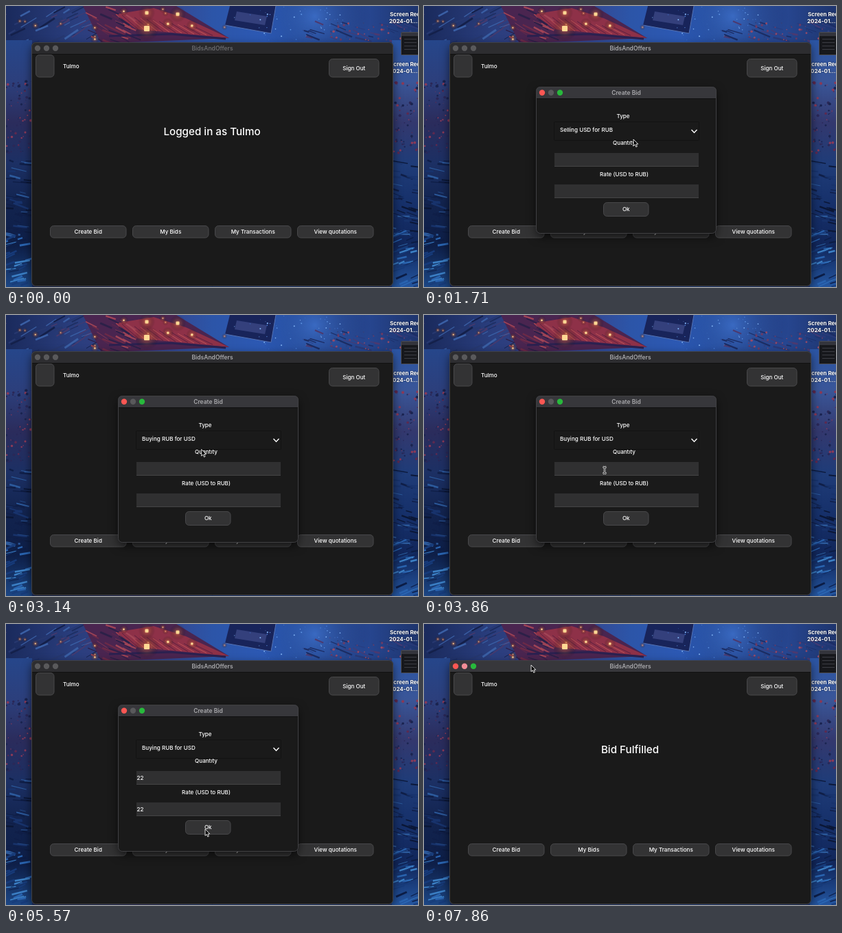
An HTML page with a canvas that plays this animation: 600x411 px, repeating every 8000 ms.

```html
<!DOCTYPE html>
<html lang="en">
<head>
<meta charset="utf-8">
<title>Bid window</title>
<style>
  html, body { margin: 0; width: 100%; height: 100%; overflow: hidden; background: #0b1838; }
  canvas { display: block; width: 600px; height: 411px; }
</style>
</head>
<body>
<canvas id="stage" width="600" height="411"></canvas>
<script>
const W = 600, H = 411, LOOP = 8000, STEPS = 56;
const USER = 'Tulmo', APP = 'BidsAndOffers';
const GRAY = '#59595b', RED = '#fc5753', GREEN = '#28b93c', PINK = '#f08c96';
const TITLE = '#a9a9ac', BODY = '#1a1a1a', BORDER = '#404043';
const stage = document.getElementById('stage').getContext('2d');
let c = stage;

// ---- drawing helpers ----
function trace(points) {
  c.beginPath();
  for (let i = 0; i < points.length; i += 2) c.lineTo(points[i], points[i + 1]);
}
function poly(fill, ...points) {
  trace(points);
  c.fillStyle = fill;
  c.fill();
}
function line(color, width, ...points) {
  trace(points);
  c.strokeStyle = color;
  c.lineWidth = width;
  c.stroke();
}
function rect(x, y, w, h, fill) {
  c.fillStyle = fill;
  c.fillRect(x, y, w, h);
}
function dot(x, y, r, fill) {
  c.beginPath();
  c.arc(x, y, r, 0, 7);
  c.fillStyle = fill;
  c.fill();
}
function box(x, y, w, h, r, fill, border) {
  c.beginPath();
  c.roundRect(x + .5, y + .5, w - 1, h - 1, r);
  c.fillStyle = fill;
  c.fill();
  if (border) { c.strokeStyle = border; c.lineWidth = 1; c.stroke(); }
}
function fade(gradient, colors) {
  colors.forEach((color, i) => gradient.addColorStop(i / (colors.length - 1), color));
  return gradient;
}
function glow(x, y, r, color) {
  const g = fade(c.createRadialGradient(x, y, 0, x, y, r), [color, 'transparent']);
  rect(x - r, y - r, 2 * r, 2 * r, g);
}
// y is the middle of the capitals
function text(s, x, y, { size = 8.1, weight = 500, color = '#fff', align = 'left' } = {}) {
  c.font = `${weight} ${size}px Inter, sans-serif`;
  c.textAlign = align;
  c.fillStyle = color;
  c.fillText(s, x, y + size * .36);
}
const centered = (s, x, y, opts) => text(s, x, y, { align: 'center', ...opts });

// ---- desktop ----
let seed = 77;
function random(min, max) {
  seed = seed * 16807 % 2147483647;
  return min + (max - min) * seed / 2147483647;
}
const pick = list => list[Math.floor(random(0, list.length))];
function scatter(count, x, y, w, h, paint) {
  for (let i = 0; i < count; i++) paint(random(x, x + w), random(y, y + h));
}
// slanted strokes that read as beams, roof tiles and ledges
function beams(count, x, y, w, h, slope, colors) {
  scatter(count, x, y, w, h, (px, py) => {
    const length = random(6, 24);
    line(pick(colors), random(.6, 3), px, py, px + length, py + length * (slope + random(-.2, .2)));
  });
}
function specks(count, x, y, w, h, size, colors) {
  scatter(count, x, y, w, h, (px, py) => dot(px, py, random(.4, size), pick(colors)));
}
function lantern(x, y, r) {
  glow(x, y, r * 4, 'rgba(255,140,90,.6)');
  box(x - r, y - r, 2 * r, 2 * r, 1, '#ffd894');
}
function sideStrip(x, colors) {
  rect(x, 50, 40, H, fade(c.createLinearGradient(0, 50, 0, H), colors));
  specks(70, x, 110, 40, 105, 2.2, ['#5c2a50', '#8a3a58', '#2a2858', '#1a2450']);
  beams(45, x - 8, 225, 40, 110, .2, ['#0b1736', '#101f48', '#18336c', '#2c5a9c']);
  beams(30, x - 8, 335, 40, 80, -.3, ['#0c1d46', '#173b7a', '#2a64b0', '#3b7fc4']);
}
function drawDesktop() {
  rect(0, 0, W, H, fade(c.createLinearGradient(0, 0, W, 0),
    ['#1a2a5c', '#2a3e7e', '#3a3f82', '#2c55a8', '#2c5ab8', '#2a4c9c', '#1e356e']));
  c.filter = 'blur(.6px)';
  beams(45, -10, 10, 145, 45, -.5, ['#14204a', '#1c2d60', '#3a5fa4', '#27386f', '#4a3a6c']);
  glow(450, 15, 80, 'rgba(80,140,230,.4)');

  // pagoda roof
  poly('#4a2550', 112, 0, 248, 0, 325, 47, 180, 53, 138, 53);
  poly('#8e3148', 160, 12, 215, 3, 262, 18, 325, 47, 190, 34);
  for (let i = 0; i < 14; i++) {
    const x = 160 + i * 9;
    line(i % 2 ? '#572040' : '#c4585a', .9, x, 12 + i * 1.5, x + 24, 34 + i * .7);
  }
  beams(30, 115, 0, 60, 50, .5, ['#6c2a48', '#a04456', '#2c2048']);
  line('#2c2150', 3, 150, 44, 240, 41, 320, 48);

  // hanging block
  poly('#18245a', 326, 0, 393, 0, 386, 40, 319, 28);
  poly('#34407c', 336, 8, 380, 15, 377, 28, 333, 21);
  line('#5573b4', 1, 319, 28, 386, 40, 393, 0);

  specks(45, 330, 0, 170, 50, 1.1, ['#7fb0f0', '#5a90e0', '#3f70c8']);
  beams(30, 430, 22, 160, 30, .35, ['#1c2d64', '#2a3a78', '#4c3a70']);
  specks(45, 470, 20, 125, 32, 1.8, ['#6a3c66', '#30407e', '#984a66']);
  scatter(14, 10, 4, 310, 45, (x, y) => lantern(x, y, random(1, 2.2)));
  lantern(205, 33, 4.5);
  lantern(205, 10, 3);
  lantern(250, 12, 3);

  sideStrip(-2, ['#26468a', '#2c3f7c', '#2b2c5c', '#1c3064', '#12234e', '#0e1f48', '#1c4684']);
  sideStrip(562, ['#2b55a4', '#3a5698', '#33386e', '#1f3c78', '#16306a', '#11265a', '#2456a0']);
  c.filter = 'none';

  // files
  const bold = { size: 8, weight: 700 };
  c.shadowColor = 'rgba(0,0,0,.7)';
  c.shadowBlur = 2;
  for (const y of [12, 85]) {
    text('Screen Recording', 559, y, bold);
    text('2024-01...', 558, y + 10.5, bold);
  }
  c.shadowBlur = 0;
  box(575, 38, 40, 34, 1, '#17181c', '#4b4c55');
  rect(576, 39, 24, 5, '#34353c');
  for (let y = 48; y < 66; y += 5) rect(580, y, 18, 1, '#3c3d44');
}
const desktop = document.createElement('canvas');
desktop.width = W;
desktop.height = H;
c = desktop.getContext('2d');
drawDesktop();
c = stage;

// ---- windows ----
function frameWindow(x, y, w, h, title, { titleColor = TITLE, bar = '#37373b', dots }) {
  c.save();
  c.shadowColor = 'rgba(0,0,0,.6)';
  c.shadowBlur = 14;
  c.shadowOffsetY = 5;
  box(x, y, w, h, 6, BODY);
  c.restore();
  c.save();
  c.beginPath();
  c.roundRect(x, y, w, h, 6);
  c.clip();
  rect(x, y, w, 17, bar);
  rect(x, y + 17, w, 1, '#111');
  c.restore();
  box(x, y, w, h, 6, 'transparent', BORDER);
  dots.forEach((color, i) => dot(x + 9 + 13 * i, y + 8.7, 4.2, color));
  centered(title, x + w / 2, y + 8.7, { size: 8.5, weight: 600, color: titleColor });
}

function button(label, x, y, w, h) {
  box(x, y, w, h, 5, '#333334', '#48484a');
  centered(label, x + w / 2, y + h / 2);
}

const MAIN_LOOKS = {
  idle: { bar: '#29292b', titleColor: '#6a6a6d', dots: [GRAY, GRAY, GRAY] },
  behind: { bar: '#2d2d30', dots: [GRAY, GRAY, GRAY] },
  active: { dots: [RED, PINK, GREEN] }
};
function mainWindow(message, look) {
  frameWindow(37, 53, 527, 357, APP, MAIN_LOOKS[look]);
  button('', 43, 71, 27.5, 33.5);
  text(USER, 83, 88);
  button('Sign Out', 470, 77, 73.5, 27.5);
  centered(message, 300, 183.5, { size: 15.2 });
  ['Create Bid', 'My Bids', 'My Transactions', 'View quotations']
    .forEach((label, i) => button(label, 64 + 120 * i, 321, 111.5, 18.5));
}

function field(label, y, value) {
  centered(label, 291.5, y - 14.5);
  rect(190, y, 210, 19, '#303031');
  rect(190, y + 19, 210, 1, '#454546');
  text(value, 190.5, y + 10);
}

function bidDialog({ options, chosen, menu, quantity, rate }) {
  frameWindow(163, 118, 263, 215, 'Create Bid', { dots: [RED, GRAY, menu ? GRAY : GREEN] });
  centered('Type', 290, 161);
  field('Quantity', 215, quantity);
  field('Rate (USD to RUB)', 261, rate);
  button('Ok', 261, 287, 66.5, 21);
  box(189, 169, 212, 28, 1, BODY, '#131313');
  if (menu) {
    line('#fff', 1.2, 192, 177.5, 194.3, 180.5, 198.5, 173.5);
    options.forEach((option, i) => text(option, 205, 177.5 + 12 * i));
  } else {
    text(options[chosen], 198, 181.5);
    line('#fff', 1.4, 389.5, 181, 393.5, 185.2, 397.5, 181);
  }
}

function transactionsWindow() {
  frameWindow(146, 50, 297, 351, 'Transactions', { dots: [RED, GRAY, GREEN] });
  text('Bought  22  USD with rate  22.00 RUB per 1 USD', 150, 81, { size: 7.75 });
}

// ---- pointer ----
const stops = [ // step, x, y
  [3, 205, 400], [8, 126, 331], [12, 305, 195], [17, 318, 177], [20, 290, 189], [27, 263, 227],
  [33, 262, 271], [39, 290, 300], [44, 356, 330], [48, 230, 78], [52, 156, 60]
];
function pointerAt(step) {
  const next = stops.findIndex(s => s[0] > step);
  if (next < 0) return stops.at(-1).slice(1);
  const [s0, x0, y0] = stops[next - 1], [s1, x1, y1] = stops[next];
  const p = (step - s0) / (s1 - s0), e = p * p * (3 - 2 * p);
  return [x0 + (x1 - x0) * e, y0 + (y1 - y0) * e];
}
function drawPointer(x, y, editing) {
  c.save();
  c.translate(x, y);
  if (editing) {
    for (const [color, width] of [['#eee', 2.6], ['#111', 1]]) {
      line(color, width, 0, -4, 0, 4);
      for (const side of [-1, 1]) line(color, width, -2.5, 5 * side, 0, 4 * side, 2.5, 5 * side);
    }
  } else {
    const arrow = [0, 0, 0, 9.6, 2.2, 7.6, 3.8, 11.2, 5.4, 10.4, 3.9, 7, 6.8, 7];
    poly('#050505', ...arrow);
    line('#f4f4f4', .9, ...arrow, 0, 0);
  }
  c.restore();
}

// ---- timeline ----
function draw(time) {
  const step = Math.floor((time % LOOP + 5) * STEPS / LOOP) % STEPS;
  const between = (from, to) => step >= from && step < to;
  const typed = from => '22'.slice(0, Math.max(0, step - from));
  const dialog = between(9, 40), list = between(45, 53);

  c.drawImage(desktop, 0, 0);
  mainWindow(step < 40 ? `Logged in as ${USER}` : 'Bid Fulfilled',
    step < 5 ? 'idle' : dialog || list ? 'behind' : 'active');
  if (dialog) bidDialog({
    options: ['Selling USD for RUB', 'Buying RUB for USD'],
    chosen: step < 21 ? 0 : 1,
    menu: between(15, 21),
    quantity: typed(28),
    rate: typed(33)
  });
  if (list) transactionsWindow();
  if (step >= stops[0][0]) {
    const [x, y] = pointerAt(step);
    const overField = [215, 261].some(top => y > top && y < top + 19);
    drawPointer(x, y, dialog && overField);
  }
}

const start = performance.now();
function tick() {
  draw(performance.now() - start);
  requestAnimationFrame(tick);
}
tick();
</script>
</body>
</html>
```
